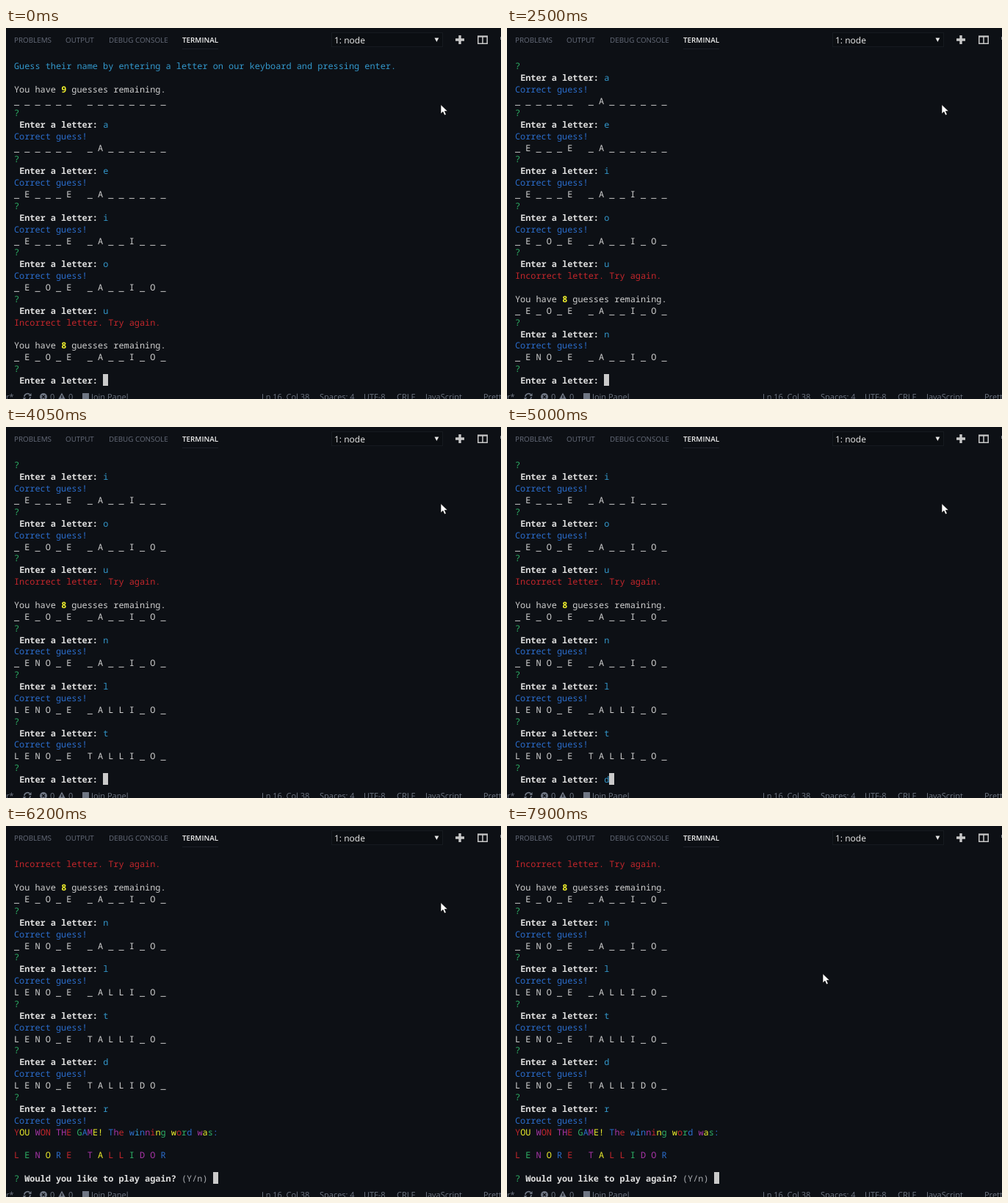
Recreate the animation shown at these times as an HTML page. Size 674 by 506 pixels, loop 8000 ms.

```html
<!DOCTYPE html>
<html lang="en">
<head>
<meta charset="utf-8">
<title>Word guessing game in a terminal</title>
<style>
  html, body { margin: 0; width: 100%; height: 100%; overflow: hidden; background: #0d1015; }
  #stage { position: relative; width: 674px; height: 506px; overflow: hidden; text-rendering: geometricPrecision; }
  svg { position: absolute; left: 0; top: 0; }
  svg text { font-family: "Open Sans", "Noto Sans", sans-serif; }
  .tabs { font-size: 9.85px; fill: #686e7c; }
  .status { font-size: 11px; fill: #6f7683; }
  pre {
    position: absolute; left: 11px; top: 45.4px; margin: 0; color: #d0d0d0;
    font: 11.88px/15.87px "Noto Sans Mono", "DejaVu Sans Mono", monospace;
  }
  pre i { font-style: normal; }
  .r { color: #c3262b; }
  .g { color: #2eb166; }
  .y { color: #ecec2c; }
  .b { color: #2b6dcc; }
  .m { color: #a835a8; }
  .c { color: #3398cc; }
  .dim { color: #a9acb0; }
  .cursor { background: #cacaca; position: relative; top: -1px; }
  pre b { color: #dedede; }
  pre b.y { color: #ecec2c; }
</style>
</head>
<body>
<div id="stage">
  <svg width="674" height="506" viewBox="0 0 674 506">
    <g class="tabs">
      <text x="11" y="20">PROBLEMS</text>
      <text x="81" y="20">OUTPUT</text>
      <text x="140" y="20">DEBUG CONSOLE</text>
      <text x="240" y="20" fill="#eeeeee" font-weight="600">TERMINAL</text>
    </g>
    <path d="M240 28.5h49" stroke="#1b1f27"/>
    <rect x="443.5" y="6.5" width="151" height="19" fill="#0b0e12" stroke="#161a20"/>
    <text x="447" y="21" font-size="12" font-weight="500" fill="#eeeeee">1: node</text>
    <path d="M583.500 13.500h5.800l-2.900 5.500z" fill="#e6e6e6"/>
    <path d="M612 16h12M618 10v12" stroke="#c8c8c8" stroke-width="3.4"/>
    <path d="M642.8 11.5h12.4v9.7h-12.4zM649 11v10" fill="none" stroke="#c8c8c8" stroke-width="1.5"/>
    <path d="M642 11.5h14" stroke="#c8c8c8" stroke-width="2"/>
    <path d="M673.5 12v4" stroke="#777c84"/>

    <g class="status">
      <text x="0" y="507">r*</text>
      <text x="60" y="507">0</text>
      <text x="85" y="507">0</text>
      <text x="116" y="507">Join Panel</text>
      <text x="348" y="507">Ln 16, Col 38</text>
      <text x="427" y="507">Spaces: 4</text>
      <text x="487" y="507">UTF-8</text>
      <text x="532" y="507">CRLF</text>
      <text x="571" y="507">JavaScript</text>
      <text x="650" y="507">Prettier</text>
      <path d="M25 503a4.2 4.2 0 0 1 7.6-2.6M33 503a4.2 4.2 0 0 1-7.6 2.6" fill="none" stroke="#6f7683" stroke-width="1.6"/>
      <path d="M34.5 498v4h-4zM23.5 508v-4h4z"/>
      <circle cx="51" cy="503" r="5"/>
      <path d="M49 501l4 4m0-4l-4 4" stroke="#0d1015" stroke-width="1.4"/>
      <path d="M76 497.5l5.5 10h-11z"/>
      <path d="M76 501v4" stroke="#0d1015" stroke-width="1.3"/>
      <rect x="104" y="498" width="9" height="9"/>
    </g>
  </svg>
  <pre id="screen"></pre>
  <svg width="674" height="506" viewBox="0 0 674 506">
    <path id="mouse" d="M0 0v12.5l3-2.7 2 4.8 2.3-1-2-4.6h4z" fill="#ffffff" stroke="#000000" stroke-width=".6"/>
  </svg>
</div>
<script>
const LOOP = 8000, STEP = 50, ROWS = 28;
const WORD = "LENORE TALLIDOR";
const screen = document.getElementById("screen");
const mouse = document.getElementById("mouse");

const ink = (color, text) => `<i class="${color}">${text}</i>`;
const rainbow = (text, colors) =>
  [...text].map((ch, i) => ch === " " ? ch : ink(colors[i], ch)).join("");

const CURSOR = ink("cursor", " ");
const PROMPT = " <b>Enter a letter:</b> ";
const log = [ink("c", "Guess their name by entering a letter on our keyboard and pressing enter."), ""];
const tried = new Set();
const screens = [];
let left = 9;

const mask = () => [...WORD].map(ch => ch === " " || tried.has(ch) ? ch : "_").join(" ");
const showLeft = () => log.push(`You have <b class="y">${left}</b> guesses remaining.`);
const ask = () => log.push(mask(), ink("g", "?"));
const snap = (at, line) => screens.push({ at, html: [...log, line].slice(-ROWS).join("\n") });

function enter(letter) {
  const key = letter.toUpperCase();
  log.push(PROMPT + ink("c", letter));
  tried.add(key);
  if (WORD.includes(key)) {
    log.push(ink("b", "Correct guess!"));
  } else {
    left--;
    log.push(ink("r", "Incorrect letter. Try again."), "");
    showLeft();
  }
}

function win() {
  log.push(
    rainbow("YOU WON THE GAME! The winning word was:",
            "ryy mrr mmr gbmyy bmr bcbmryg yrgb mygb"),
    "",
    rainbow(mask(), "r g m y b r   m y r r g m m b"),
    "");
}

// Letters already played, then letter, time typed, time entered
showLeft();
ask();
for (const letter of "aeiou") { enter(letter); ask(); }
snap(0, PROMPT + CURSOR);

const plays = [["n", 700, 950], ["l", 2550, 2700], ["t", 3150, 4050], ["d", 4900, 5150], ["r", 5900, 6200]];
for (const [letter, typed, entered] of plays) {
  snap(typed, PROMPT + ink("c", letter) + CURSOR);
  enter(letter);
  if (mask().includes("_")) {
    ask();
    snap(entered, PROMPT + CURSOR);
  } else {
    win();
    snap(entered, `${ink("g", "?")} <b>Would you like to play again?</b> ${ink("dim", "(Y/n)")} ${CURSOR}`);
  }
}

let shown;
function draw(now) {
  const t = Math.floor(now % LOOP / STEP) * STEP;
  const current = screens.filter(s => s.at <= t).pop();
  if (current !== shown) {
    shown = current;
    screen.innerHTML = current.html;
  }
  const p = Math.min(1, Math.max(0, (t - 6700) / 800));
  const e = p * p * (3 - 2 * p);
  mouse.setAttribute("transform", `translate(${592 - 162 * e} ${104.5 + 97 * e})`);
}

const start = performance.now();
function tick() {
  draw(performance.now() - start);
  requestAnimationFrame(tick);
}
tick();
</script>
</body>
</html>
```
